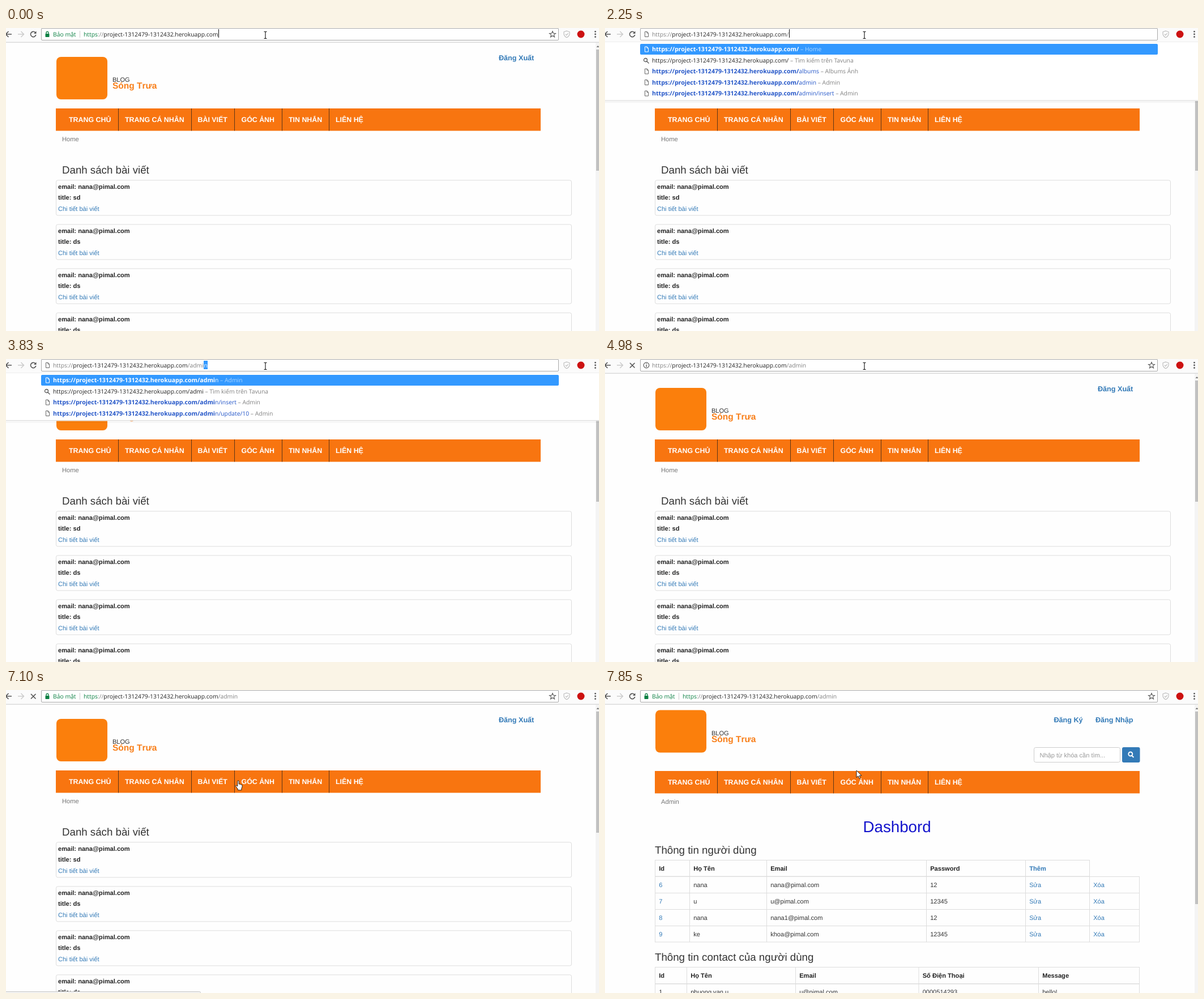
Write an HTML page that moves like this. It is 1047 px wide and 535 px high and loops after 8 s.

```html
<!DOCTYPE html>
<html lang="vi">
<head>
<meta charset="utf-8">
<style>
html, body { margin: 0; width: 100%; height: 100%; overflow: hidden; background: #fff; }
svg { display: block; width: 100vw; height: 100vh; }
text { font: 11.05px "Liberation Sans", Arial, sans-serif; font-kerning: none; text-rendering: geometricPrecision; white-space: pre; fill: #333; }
.b { font-weight: 700; font-size: 11.1px; fill: #222; }
.link { fill: #337ab7; }
.nav { font-weight: 700; font-size: 12.4px; fill: #fff; }
.user { font-weight: 700; font-size: 12.6px; fill: #337ab7; }
.h { font-size: 18.7px; }
.muted { fill: #777; }
.ui { font: 10.37px "Open Sans", "Noto Sans", sans-serif; fill: #222; }
.ui .m { font-weight: 700; font-size: 10.6px; }
.ui .g { fill: #808080; }
.ui .ok { fill: #0b8043; }
.line { fill: none; stroke: #ddd; }
.ico { fill: none; stroke: #5a5a5a; stroke-width: 1.2; }
</style>
</head>
<body>
<svg id="stage" viewBox="0 0 1047 535"></svg>
<script>
const stage = document.getElementById('stage');
const SITE = 'project-1312479-1312432.herokuapp.com';
const LOOP = 8000;

const text = (x, y, s, cls = '', style = '') => `<text x="${x}" y="${y}" class="${cls}" style="${style}">${s}</text>`;
const span = (s, cls, style = '') => `<tspan class="${cls}" style="${style}">${s}</tspan>`;
const rect = (x, y, w, h, fill, extra = '') => `<rect x="${x}" y="${y}" width="${w}" height="${h}" fill="${fill}" ${extra}/>`;
const path = (d, attrs = 'class="ico"') => `<path d="${d}" ${attrs}/>`;
const at = (x, y, s) => `<g transform="translate(${x} ${y})">${s}</g>`;
const latest = (keys, t) => keys.filter(k => k[0] <= t).pop();

// [time, text typed after the host, left edge of the completed selection]
const typing = [[2250, '/', 0], [3170, '/a', 331], [3300, '/ad', 337], [3580, '/adm', 346.5], [3830, '/admi', 349.5]];

// [time, shape, x, y]
const pointer = [
  [0, 'beam', 458, 12.5], [6310, 'arrow', 441, 24], [6430, 'arrow', 428, 40],
  [6740, 'arrow', 424, 62], [6860, 'arrow', 418, 98], [6980, 'arrow', 412, 132],
  [7100, 'hand', 410, 160], [7590, 'hand', 436, 152], [7720, 'arrow', 468, 106], [7850, 'arrow', 444, 142]
];
const shapes = {
  beam: path('M-2.5-6H-.7L0-5.3.7-6H2.5M0-5.3V5.3M-2.5 6H-.7L0 5.3.7 6H2.5', 'fill="none" stroke="#111" stroke-width="1.1"'),
  arrow: path('M0 0V12.5L3 9.8 5 14.5 7 13.6 5 9.2H9Z', 'fill="#fff" stroke="#111" stroke-width=".9"'),
  hand: path('M-1.2 10V1.2a1.2 1.2 0 0 1 2.4 0V6l2 .3 2 .6 1.8.8V11l-1.2 3v2.8h-6.5v-2l-4-5.2q0-1.6 1.5-1z', 'fill="#fff" stroke="#111" stroke-width=".9"')
};

const logo = dy => at(0, dy,
  rect(89, 51, 90, 75, '#fb7f0c', 'rx="8"') +
  text(188, 95, 'BLOG', '', 'font:900 25px "Noto Serif",serif;letter-spacing:1px;fill:#f87510') +
  text(188, 107, 'Sóng Trưa', '', 'font-weight:700;font-size:15.5px;fill:#f87f1a'));

const nav = (y, crumb) => at(0, y,
  rect(88, 0, 856, 39.5, '#f87510') +
  [198, 327, 403, 487, 570].map(x => rect(x, 0, 1, 39.5, '#5c3517')).join('') +
  [[111, 'TRANG CHỦ'], [210, 'TRANG CÁ NHÂN'], [338.5, 'BÀI VIẾT'], [415.5, 'GÓC ẢNH'], [499, 'TIN NHẮN'], [582, 'LIÊN HỆ']]
    .map(([x, s]) => text(x, 23.5, s, 'nav')).join('') +
  text(99, 57.5, crumb, 'muted', 'font-size:11.2px'));

const scrollbar = h => rect(1041, 26, 6, 509, '#f4f4f4') +
  path('M1042.5 34l2.5-3 2.5 3z', 'fill="#777"') + rect(1042, 38, 5, h, '#c1c1c1');

const post = (y, title) => at(0, y,
  rect(88.5, .5, 910, 62, '#fefefe', 'rx="3" stroke="#ddd"') +
  text(92, 15.5, 'email: nana@pimal.com', 'b') +
  text(92, 35, 'title: ' + title, 'b') +
  text(92, 54.5, 'Chi tiết bài viết', 'link'));

const homePage = logo(0) + text(870, 56.5, 'Đăng Xuất', 'user') + nav(142, 'Home') +
  text(99, 257, 'Danh sách bài viết', 'h') +
  ['sd', 'ds', 'ds', 'ds'].map((s, i) => post(268.4 + 78 * i, s)).join('') + scrollbar(214);

const cells = (cols, y, row, cls) => row.map((s, i) =>
  text(cols[i] + 6.7, y, s, cls + (s === 'Thêm' || cls === '' && (s === 'Sửa' || s === 'Xóa' || /^[6-9]$/.test(s)) ? ' link' : ''),
    s === 'Thêm' ? 'fill:#337ab7' : '')).join('');

const users = [88.5, 149.5, 285.5, 567.5, 742.5, 855.5, 943.5];
const contacts = [88.5, 144.5, 336.5, 554, 765.5, 943.5];
const people = [['6', 'nana', 'nana@pimal.com', '12'], ['7', 'u', 'u@pimal.com', '12345'],
  ['8', 'nana', 'nana1@pimal.com', '12'], ['9', 'ke', 'khoa@pimal.com', '12345']];

const userTable =
  path(users.slice(0, 6).map(x => `M${x} 300V445`).join('') + 'M943.5 329V445M88 300.5H856M88 329.5H944' +
    [358.5, 387.5, 416.5, 445].map(y => `M88 ${y}H944`).join(''), 'class="line"') +
  path('M88 329H856', 'class="line"') +
  cells(users, 318.5, ['Id', 'Họ Tên', 'Email', 'Password', 'Thêm'], 'b') +
  people.map((p, i) => cells(users, 348 + 28.9 * i, [...p, 'Sửa', 'Xóa'], '')).join('');

const contactTable =
  path(contacts.map(x => `M${x} 489V535`).join('') + 'M88 489.5H944M88 519H944', 'class="line"') +
  path('M88 518.5H944', 'class="line"') +
  cells(contacts, 508, ['Id', 'Họ Tên', 'Email', 'Số Điện Thoại', 'Message'], 'b') +
  cells(contacts, 537, ['1', 'phuong van u', 'u@pimal.com', '0000514293', 'hello!'], '');

const adminPage = logo(-15.5) + text(792.5, 56.5, 'Đăng Ký', 'user') + text(866, 56.5, 'Đăng Nhập', 'user') +
  rect(757.5, 101.5, 152, 26, '#fff', 'rx="3" stroke="#ccc"') +
  text(767.5, 118.5, 'Nhập từ khóa cần tìm...', '', 'fill:#999') +
  rect(913, 101, 31.5, 27, '#337ab7', 'rx="3"') +
  path('M930.4 116l3 3M931.3 113a3.5 3.5 0 1 1-7 0a3.5 3.5 0 1 1 7 0', 'fill="none" stroke="#fff" stroke-width="1.9"') +
  nav(143, 'Admin') +
  text(455.5, 251, 'Dashbord', '', 'font-size:27.7px;fill:#1414cc') +
  text(88, 288.5, 'Thông tin người dùng', 'h') + userTable +
  text(88, 477.5, 'Thông tin contact của người dùng', 'h') + contactTable + scrollbar(340);

const pageIcon = (y, color) => at(70, y, path('M.5-4.5H4.2L6.5-2.2V4.5H.5ZM4-4.5V-2H6.5', `fill="none" stroke="${color}"`));
const lens = y => at(72, y, path('M2 2l3.5 3.5M2.5 -.5a3 3 0 1 1-6 0a3 3 0 1 1 6 0', 'fill="none" stroke="#555" stroke-width="1.3"'));

// Suggestions under the address field; the part already typed is bold.
function dropdown(typed) {
  const site = 'https://' + SITE;
  const list = typed === '/' ? [['/', 'Home'], 0, ['/albums', 'Albums Ảnh'], ['/admin', 'Admin'], ['/admin/insert', 'Admin']]
    : [['/admin', 'Admin'], 0,
      ...(typed === '/a' ? [['/albums', 'Albums Ảnh'], ['/admin/insert', 'Admin']]
        : [['/admin/insert', 'Admin'], ['/admin/update/10', 'Admin']])];
  const bottom = 31.5 + 19.5 * list.length;
  const rows = list.map((item, i) => {
    const y = 37.5 + 19.5 * i;
    if (!item) return lens(y) + text(83, y + 3.5, site + typed + span(' – Tìm kiếm trên Tavuna', 'g'), 'ui');
    const color = i ? '#2456c8' : '#fff';
    const note = i ? '#808080' : '#add6ff';
    return pageIcon(y, i ? '#666' : '#fff') + text(83, y + 3.7,
      span(site + typed, 'm', 'fill:' + color) + span(item[0].slice(typed.length), '', 'fill:' + color) +
      span(' – ' + item[1], '', 'fill:' + note), 'ui');
  });
  return rect(0, bottom, 1047, 3, '#000', 'opacity=".035"') + rect(0, 25, 1047, bottom - 25, '#fff') +
    rect(0, bottom - 1.5, 1047, 1, '#d8d8d8') + rect(62, 28, 914, 19, '#3399ff', 'rx="2"') + rows.join('');
}

const star = path('M965 5.7l1.5 3.6 3.9.3-3 2.5 1 3.8-3.4-2.1-3.4 2.1 1-3.8-3-2.5 3.9-.3z');
const lock = rect(69.5, 10, 7, 6, '#0b8043', 'rx=".8"') +
  path('M71 10V8.5a2 2 0 0 1 4 0V10', 'fill="none" stroke="#0b8043" stroke-width="1.3"');
const info = '<circle cx="73" cy="11" r="4.8" class="ico"/>' + path('M73 10.2V14M73 7.8V9', 'stroke="#555" stroke-width="1.4"');

function toolbar(t, entry) {
  const loading = t >= 4980 && t < 7380;
  const secure = t < 2250 || t >= 6170;
  const x = secure ? 137 : 83;
  const tail = t < 2250 ? '' : entry ? (entry[2] ? '/admin' : '/') : '/admin';
  const url = (secure ? span('https', 'ok') : span('https', 'g')) + span('://', 'g') + SITE + span(tail, 'g');
  let s = rect(0, 0, 1047, 25, '#fbfbfb') + rect(0, 24.7, 1047, 1, '#c9c9c9') +
    rect(62.5, .5, 913, 21, '#fff', 'rx="1.5" stroke="#a9a9a9"') +
    path('M10 11H0M4.5 6L-.5 11l5 5', 'fill="none" stroke="#555" stroke-width="1.6"') +
    path('M21 11H31M26.5 6l5 5-5 5', 'fill="none" stroke="#ccc" stroke-width="1.5"') +
    (loading ? path('M44 7l8.5 8.5M52.5 7L44 15.5', 'stroke="#555" stroke-width="1.6"')
      : path('M51.8 8A4.7 4.7 0 1 0 52.8 12', 'fill="none" stroke="#555" stroke-width="1.6"') + path('M53.5 5.5V10H49z', 'fill="#555"')) +
    (secure ? lock + text(83, 14.8, 'Bảo mật', 'ui', 'fill:#0b8043') + rect(130, 5, 1, 12, '#ccc')
      : entry ? pageIcon(11, '#666') : info) +
    text(x, 14.8, url, 'ui') + (entry ? '' : star) +
    path('M990 5.2l5 1.6v4q-.8 4-5 6q-4.2-2-5-6v-4zM987.8 10.8l1.8 1.8 3-3.3', 'fill="none" stroke="#bbb" stroke-width="1.1"') +
    '<circle cx="1015" cy="11" r="6.5" fill="#cc1111"/>' +
    [6.3, 11, 15.7].map(y => `<circle cx="1040.5" cy="${y}" r="1.4" fill="#555"/>`).join('');
  if (entry && entry[2]) {
    const rest = '/admin'.slice(entry[1].length);
    s += rect(entry[2] - .5, 3, 356.5 - entry[2], 15, '#3399ff') + text(entry[2], 14.8, rest, 'ui', 'fill:#fff');
  }
  if (t < 380 || t >= 940 && t < 1440 || t >= 1970 && t < 2250) s += rect(375, 2, 1, 15, '#111');
  if (t >= 2250 && t < 2650) s += rect(325, 2, 1, 15, '#111');
  return s;
}

function picture(t) {
  const entry = t >= 2250 && t < 4980 ? latest(typing, t) : null;
  const [, shape, x, y] = latest(pointer, t);
  return rect(0, 0, 1047, 535, '#fefefe') + (t < 7250 ? homePage : adminPage) +
    (t >= 5450 && t < 7590 ? rect(-2, 532.5, 345.5, 8, '#f2f2f2', 'rx="2" stroke="#c8c8c8"') : '') +
    toolbar(t, entry) + (entry ? dropdown(entry[1]) : '') + at(x, y, shapes[shape]);
}

let shown = '';
function tick() {
  const next = picture(performance.now() % LOOP);
  if (next !== shown) stage.innerHTML = shown = next;
  requestAnimationFrame(tick);
}
tick();
</script>
</body>
</html>
```
